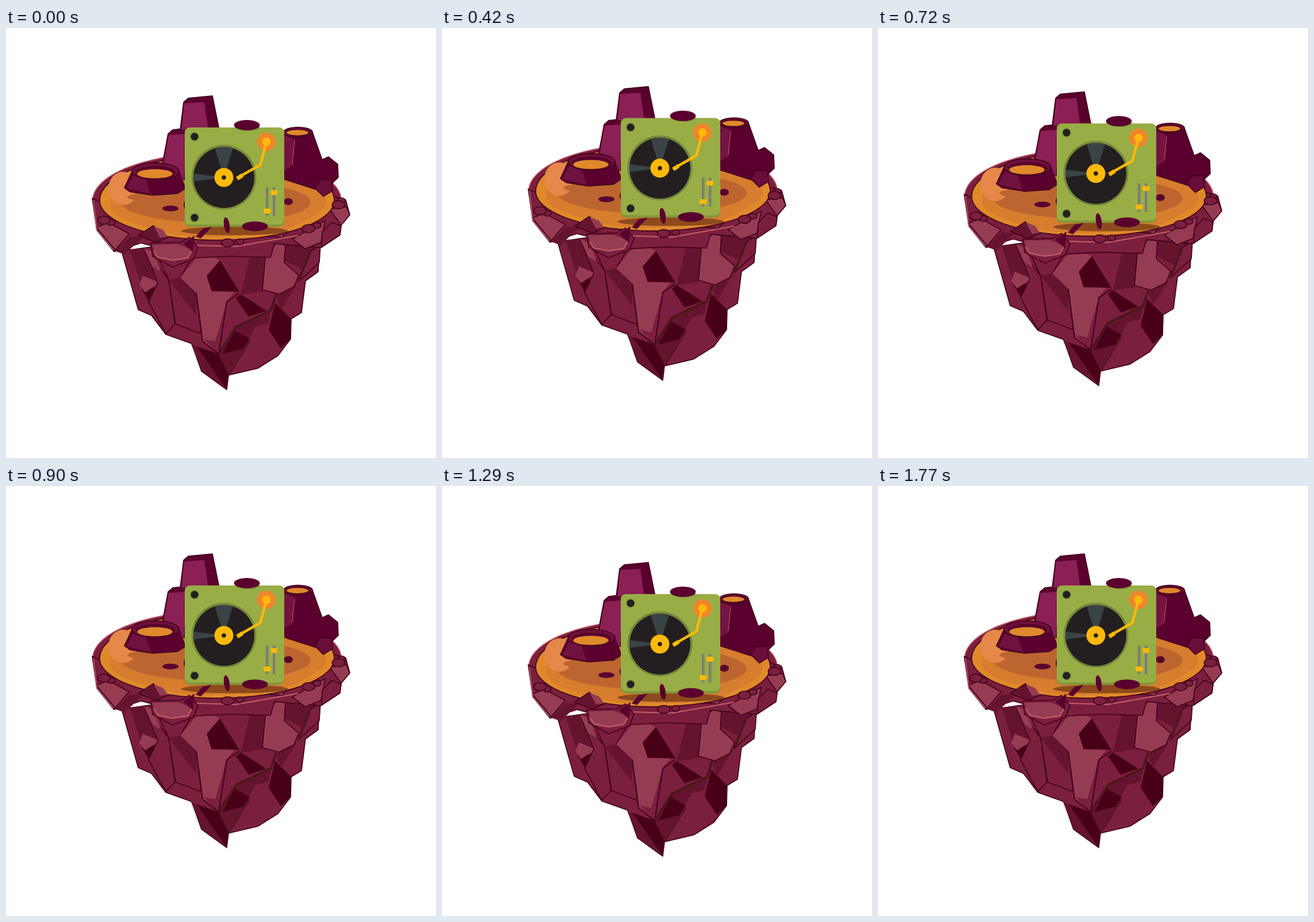
An HTML page with a canvas that plays this animation: 748x748 px, repeating every 1.8 s.

```html
<!DOCTYPE html>
<html lang="en">
<head>
<meta charset="utf-8">
<title>Floating turntable</title>
<style>
html, body { margin: 0; width: 100%; height: 100%; overflow: hidden; background: #fff; }
canvas { display: block; }
</style>
</head>
<body>
<canvas id="stage" width="748" height="748"></canvas>
<script>
const ctx = document.getElementById('stage').getContext('2d');

const LINE = '#3f0019', DEEP = '#480018', DARK = '#651430', MID = '#7b1f3e',
  LIGHT = '#963c52', PINK = '#c4606a', PLUM = '#5b002e', BERRY = '#8a2055',
  GOLD = '#e0892b', AMBER = '#d67d2e', CLAY = '#bc6530', PEACH = '#e5884a',
  SHADE = '#8d4b1d', CRACK = '#4a1816', GREEN = '#98ad45', OLIVE = '#75893a',
  INK = '#231f20', YELLOW = '#ffb90b';

const FULL = Math.PI * 2;
const RIM = { x: 367, y: 300, rx: 204, up: 78, down: 69 };

function paint(fill, line, width = 1.6) {
  if (fill) { ctx.fillStyle = fill; ctx.fill(); }
  if (line) { ctx.strokeStyle = line; ctx.lineWidth = width; ctx.stroke(); }
}

function trace(points) {
  ctx.beginPath();
  points.split(' ').forEach(p => ctx.lineTo(...p.split(',')));
}

function poly(points, fill, line, width) {
  trace(points);
  ctx.closePath();
  paint(fill, line, width);
}

function stroke(points, line, width) {
  trace(points);
  paint(null, line, width);
}

function oval(x, y, rx, ry, fill, line, width, turn = 0) {
  ctx.beginPath();
  ctx.ellipse(x, y, rx, ry, turn, 0, FULL);
  paint(fill, line, width);
}

const disc = (x, y, r, fill) => oval(x, y, r, r, fill);

function box(x, y, w, h, r, fill) {
  ctx.beginPath();
  ctx.roundRect(x, y, w, h, r);
  paint(fill);
}

// point on the plateau edge, pushed outward by a factor
function edge(a, k = 1) {
  const c = Math.cos(a), s = Math.sin(a);
  return [RIM.x + RIM.rx * k * c, RIM.y + (s < 0 ? RIM.up : RIM.down) * k * s];
}

// plateau outline, optionally wavy
function plateau(k, wave, fill, line) {
  ctx.beginPath();
  for (let a = 0; a < FULL; a += 0.04) ctx.lineTo(...edge(a, k + wave * Math.sin(7 * a + 1)));
  ctx.closePath();
  paint(fill, line);
}

function rock() {
  poly('201,388 230,490 253,500 278,533 323,549 340,597 384,629 387,604 438,592 473,570 495,541 496,506 514,495 521,440 543,424 546,378 400,360', MID, LINE);

  // left columns
  poly('215,385 240,383 262,440 248,476 233,440', DARK);
  poly('236,454 260,452 248,474', DEEP);
  poly('232,447 238,431 267,443 242,460', LIGHT);
  poly('240,383 283,438 294,515 278,532 248,476 264,443', MID, LINE);
  poly('240,383 256,390 270,424 254,414', LIGHT);
  poly('283,438 265,400 322,402 303,434 331,461 340,532 295,515', MID, LINE);
  poly('283,438 303,434 331,462 331,500', DARK);

  // tip
  poly('322,550 370,567 424,541 388,603 384,629 342,598', DARK);
  poly('332,554 370,567 387,602 384,629', DEEP);

  // lower right
  poly('388,603 370,568 400,522 462,491 456,514 434,520', DARK);
  poly('398,526 424,541 413,558 376,567', DEEP);
  poly('468,478 496,506 495,541 478,557 457,525', DEEP);
  poly('470,466 506,445 478,491', DARK);

  // middle
  poly('385,478 406,462 471,460 464,490 403,518 378,548', MID);
  poly('408,463 453,492 422,502 400,470', DEEP);
  poly('427,388 450,394 447,458 408,464', DARK);
  poly('372,404 406,459 358,458 349,431', DEEP);
  poly('303,434 340,389 372,404 349,431 357,458 397,459 384,476 370,567 342,545 331,461', LIGHT);
  poly('384,476 370,567 343,541 364,545', MID);
  stroke('331,461 342,545 370,567 384,476 406,461', LINE, 2);
  stroke('370,567 400,520 461,491 470,463', CRACK, 4);
  stroke('388,603 424,545', CRACK, 2);

  // right columns
  poly('483,379 520,370 547,378 513,419 484,404', DARK);
  poly('452,390 474,372 486,378 484,408 509,430 501,450 475,463 446,455', LIGHT, LINE);
  poly('529,389 547,378 545,408 508,442', MID, LINE);
  stroke('529,390 509,440', CRACK, 4);
}

function rim() {
  plateau(1.06, 0, MID, PINK);
  poly('150,296 158,352 188,389 235,374 330,400 389,397 460,399 467,375 548,382 581,360 583,343 598,325 591,299 560,290 480,364 260,352', MID, LINE);
  poly('157,347 178,338 214,358 190,386', LIGHT, LINE);
  poly('190,388 216,362 238,364 206,394', DARK);
  poly('498,367 555,335 548,373 520,384', LIGHT, LINE);
  poly('550,355 567,338 583,345 581,360 549,381', MID, LINE);
  poly('563,315 592,311 598,325 583,343', LIGHT, LINE);
  stroke('152,300 158,352 187,386', PINK, 1.5);
  stroke('332,378 400,380 508,361', PINK, 2);
}

function ground() {
  plateau(1, 0, GOLD, LINE);
  plateau(0.92, 0.015, AMBER);
  oval(365, 303, 165, 36, CLAY);
  oval(204, 279, 26, 29, PEACH);
  oval(259, 294, 48, 8, CLAY);
  oval(398, 353, 93, 7.5, SHADE);
  oval(286, 314, 14, 5, PLUM);
  oval(491, 302, 8, 6, PLUM);
  oval(314, 308, 5, 8, PLUM);
}

// tapered block with a lit face; each end is [left, right, y]
function block([l, r, y], [bl, br, by]) {
  const lit = 0.72, cap = 11;
  poly(`${l},${y + cap} ${l + 8},${y + 4} ${r},${y} ${br},${by} ${bl},${by}`, PLUM, LINE);
  poly(`${l + 1},${y + cap + 2} ${l + (r - l) * lit},${y + cap} ${bl + (br - bl) * lit},${by} ${bl + 2},${by}`, BERRY);
}

function mouth(x, y, rx, ry, drop) {
  oval(x, y, rx, ry, '#6f0f3c', LINE);
  oval(x, y + drop / 2, rx * 0.82, ry * 0.7, PLUM, LINE, 1);
  oval(x - 1, y + drop, rx * 0.75, ry * 0.55, GOLD);
}

function towers() {
  block([282, 326, 173], [267, 326, 264]);
  block([309, 359, 118], [303, 371, 177]);

  poly('483,181 533,181 550,229 561,224 577,237 578,260 552,285 480,262', PLUM, LINE);
  poly('484,187 501,193 498,240 484,247', '#751342');
  stroke('502,195 498,237', PINK, 1);
  mouth(508, 181, 25, 8.5, 1);
  poly('537,278 546,264 566,264 568,283 552,293', '#6a0e3c', LINE);

  poly('219,250 206,278 216,285 255,291 298,288 312,279 301,250', PLUM, LINE);
  poly('221,256 243,263 252,289 209,279', '#6f1240');
  mouth(260, 249, 41, 14.5, 4.5);
}

// a large and a small pebble at each spot along the edge
function stones() {
  for (const deg of [5, 41, 84, 153]) {
    const a = deg * FULL / 360;
    const [x, y] = edge(a, 1.06), [u, v] = edge(a - 0.08, 1.06);
    oval(u, v, 7, 5, MID, LINE);
    oval(x - 4, y + 1, 11, 7, MID, LINE);
  }
  poly('230,361 256,344 282,364 262,373', DARK, LINE);
  poly('257,345 273,351 282,363 268,365', LIGHT);
  poly('252,374 303,373 319,364 334,382 326,402 290,416 255,397', MID, LINE);
  poly('254,377 298,376 325,386 316,400 290,404 264,399', LIGHT);
  stroke('257,387 264,399 290,404 316,400 323,388', PINK, 2);
  poly('308,375 328,361 325,390', PLUM);
  poly('330,363 342,349 358,346 339,366', PLUM);
}

function record(x, y, r) {
  disc(x, y - 0.5, r + 3.5, OLIVE);
  disc(x, y, r, INK);
  for (const a of [-Math.PI / 2, Math.PI]) {
    ctx.beginPath();
    ctx.moveTo(x, y);
    ctx.arc(x, y, r, a - (a < 0 ? 0.3 : 0.13), a + (a < 0 ? 0.3 : 0.13));
    paint('#3a4446');
  }
  disc(x, y, 16.5, YELLOW);
  disc(x, y, 3.8, INK);
}

function player() {
  box(311, 173, 173, 173, 9, '#81963b');
  box(311, 173, 173, 169, 9, GREEN);
  for (const y of [189, 330]) {
    disc(328, y, 7.8, OLIVE);
    disc(328, y, 6.5, INK);
  }
  record(379, 260, 53);

  disc(453, 198, 16, '#f0852a');
  stroke('453,198 442.5,238 409,257', YELLOW, 4.6);
  disc(453, 198, 7.3, YELLOW);
  stroke('402,262 411.5,256', YELLOW, 7);

  for (const [x, knob] of [[454, 318], [466, 286]]) {
    box(x - 2, 277, 4.5, 50, 1, '#7d7e72');
    box(x - 6, knob - 4, 12.5, 8.5, 3.5, YELLOW);
  }
}

function chips() {
  oval(421, 173, 20, 6, OLIVE);
  oval(419, 169, 22.5, 9, PLUM);
  oval(433, 345, 22.5, 8.5, PLUM);
  oval(384, 343, 5, 14, PLUM, null, 0, -0.15);
}

// rises, sinks, then returns to rest at an even pace
function shift(ms) {
  const amp = 17.3;
  if (ms < 450) return -amp * ms / 450;
  if (ms < 1350) return amp * (ms - 900) / 450;
  return amp * (1770 - ms) / 420;
}

function draw(now) {
  const ms = Math.floor((now % 1800) / 30) * 30;
  ctx.fillStyle = '#fff';
  ctx.fillRect(0, 0, 748, 748);
  ctx.save();
  ctx.translate(0, shift(ms));
  ctx.lineJoin = 'round';
  for (const part of [rock, rim, ground, towers, stones, player, chips]) part();
  ctx.restore();
}

const start = performance.now();
function tick() {
  draw(performance.now() - start);
  requestAnimationFrame(tick);
}
tick();
</script>
</body>
</html>
```
